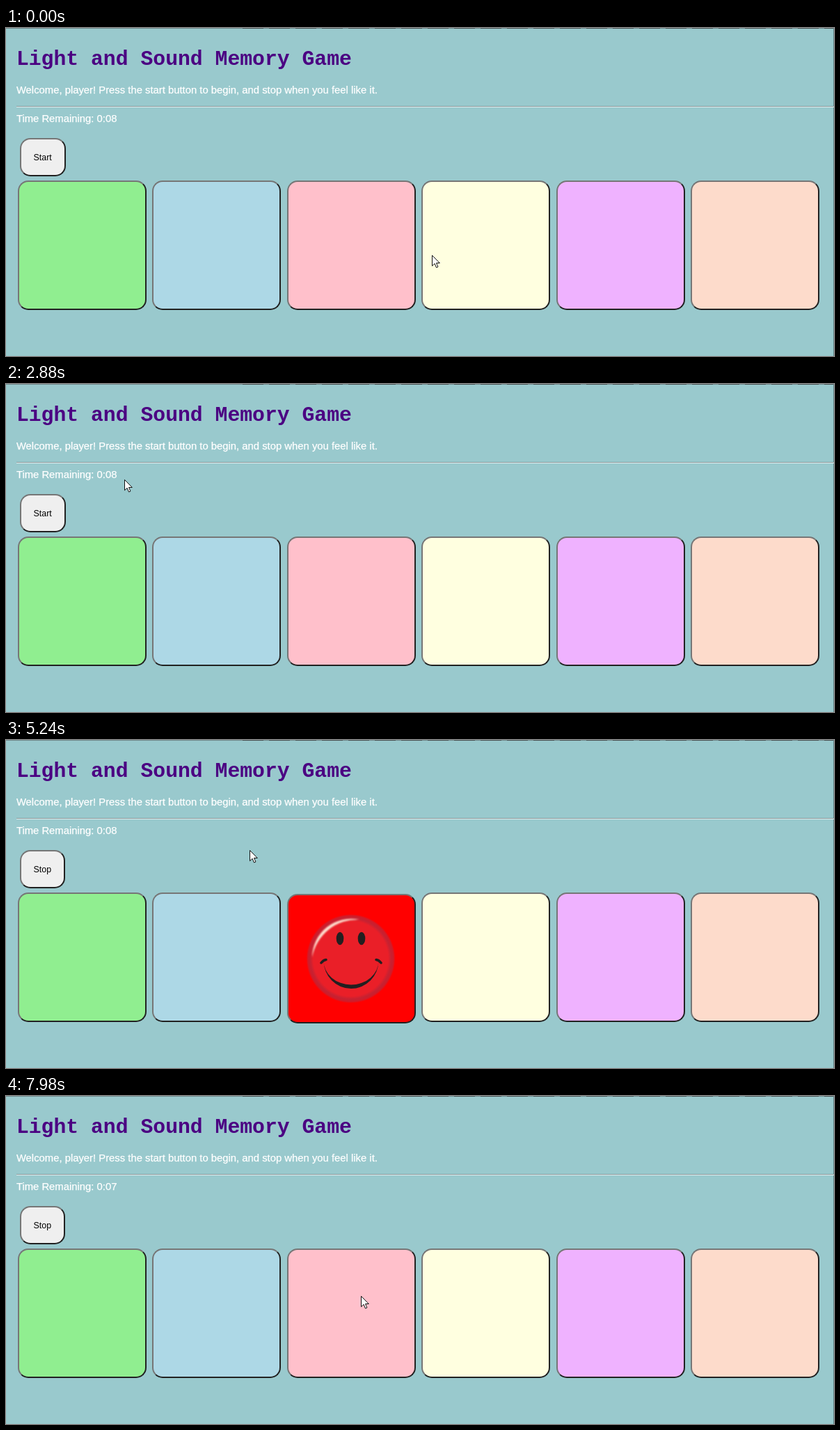
Write an HTML page that moves like this. It is 1190 px wide and 471 px high and loops after 8000 ms.

```html
<!DOCTYPE html>
<html lang="en">
<head>
<meta charset="utf-8">
<title>Memory Game</title>
<style>
html, body { margin: 0; width: 100%; height: 100%; overflow: hidden; }
body { position: relative; background: #99c9cd; }
.box {
  position: absolute; box-sizing: border-box; border: 2px solid;
  border-color: #767676 #212121 #212121 #767676; border-radius: 15px;
}
.tile { top: 219px; width: 185px; height: 186px; }
#button { left: 20px; top: 158px; height: 55px; background: #efefef; }
svg { position: absolute; left: 0; top: 0; }
text { font: 14.84px "Liberation Sans", Arial, sans-serif; fill: #fff; stroke: #fff; stroke-width: .25px; }
text.title { font: bold 29.76px "Courier New", "Liberation Mono", monospace; fill: #4b0082; stroke: none; }
text.label { font-size: 12.4px; fill: #000; stroke: none; }
</style>
</head>
<body>
<div class="box" id="button"></div>
<svg width="1190" height="471" viewBox="0 0 1190 471">
  <defs>
    <radialGradient id="rim">
      <stop offset=".84" stop-color="#ea1f28"/>
      <stop offset=".91" stop-color="#c52232"/>
      <stop offset=".96" stop-color="#cf1c2a"/>
      <stop offset="1" stop-color="#f00"/>
    </radialGradient>
    <filter id="soft"><feGaussianBlur stdDeviation=".8"/></filter>
  </defs>

  <path d="M0 .5H1190" stroke="#718a8d"/>
  <path d="M340 .5H1190" stroke="#4b5253" stroke-dasharray="30 8"/>
  <path d="M1189.5 0V471" stroke="#66868a"/>
  <path d="M15 112.5H1190" stroke="#87999b"/>
  <path d="M15 113.5H1190" stroke="#e3eeef"/>

  <text class="title" x="14.9" y="53">Light and Sound Memory Game</text>
  <text x="14.9" y="94">Welcome, player! Press the start button to begin, and stop when you feel like it.</text>
  <text id="timer" x="14.9" y="135"></text>
  <text class="label" id="label" x="39.6" y="189.5"></text>

  <g id="face">
    <circle cx="495.5" cy="314" r="64" fill="url(#rim)"/>
    <path d="M440 312A56 56 0 0 1 508 258A66 66 0 0 0 440 312Z" fill="#fde0d0" filter="url(#soft)"/>
    <g fill="#231f20">
      <ellipse cx="480" cy="285" rx="5.3" ry="9.3"/>
      <ellipse cx="511" cy="285" rx="5.3" ry="9.3"/>
      <path d="M456.500 317A39.500 40 0 0 0 535.500 317A39.500 34.500 0 0 1 456.500 317Z"/>
    </g>
    <path d="M453 320Q456 316 460 315.500M539 320Q536 316 532 315.500" fill="none" stroke="#231f20" stroke-width="3.500" stroke-linecap="round"/>
  </g>

  <path id="cursor" d="M.5 .5V15.700L4.100 12.300L6.500 18L8.900 17L6.500 11.500H11.300Z" fill="#fff" stroke="#111"/>
</svg>
<script>
const LOOP = 8000, STEP = 135;
const CLICK = 4270, LIGHT_ON = 5240, LIGHT_OFF = 6270, TICK = 7280;
const COLORS = ["#90ee90", "#add8e6", "#ffc0cb", "#ffffe0", "#efb2ff", "#fddbcb"];

// Turning points and rests of the pointer: [time, x, y].
const KEYS = [
  [470, 612, 326], [730, 478, 294], [990, 176, 203], [1380, 98, 140], [1750, 109, 103],
  [2050, 250, 52], [2330, 361, 99], [2590, 315, 131], [2880, 170, 137], [3570, 62, 183],
  [4540, 60, 184], [4790, 162, 177], [5090, 336, 160], [5240, 350, 158], [6400, 350, 158],
  [7280, 478, 162], [7680, 485, 179], [7980, 510, 287]
];

const byId = id => document.getElementById(id);
const button = byId("button"), label = byId("label"), timer = byId("timer");
const face = byId("face"), cursor = byId("cursor");

const tiles = COLORS.map((color, i) => {
  const tile = document.createElement("div");
  tile.className = "box tile";
  tile.style.left = Math.round(16.74 + 193.44 * i) + "px";
  tile.style.background = color;
  button.before(tile);
  return tile;
});

function slope(i, axis) {
  const a = KEYS[i], b = KEYS[i + 1];
  return a && b ? (b[axis] - a[axis]) / (b[0] - a[0]) : 0;
}

// Harmonic mean of the neighbouring slopes: smooth, without overshoot.
function tangent(i, axis) {
  const before = slope(i - 1, axis), after = slope(i, axis);
  return before * after > 0 ? 2 * before * after / (before + after) : 0;
}

// The pointer follows a smooth curve but is only redrawn about every STEP ms.
function pointerAt(t) {
  const i = KEYS.findLastIndex(key => key[0] <= t);
  if (i < 0) return KEYS[0].slice(1);
  const a = KEYS[i], b = KEYS[i + 1];
  if (!b) return a.slice(1);
  const span = b[0] - a[0], steps = Math.round(span / STEP);
  const u = Math.floor(steps * (t - a[0]) / span) / steps, v = 1 - u;
  return [1, 2].map(axis =>
    a[axis] * v * v * (1 + 2 * u) + b[axis] * u * u * (3 - 2 * u) +
    span * u * v * (tangent(i, axis) * v - tangent(i + 1, axis) * u));
}

function render(t) {
  const started = t >= CLICK;
  label.textContent = started ? "Stop" : "Start";
  button.style.width = started ? "65px" : "66px";
  timer.textContent = "Time Remaining: 0:0" + (t >= TICK ? 7 : 8);

  const lit = t >= LIGHT_ON && t < LIGHT_OFF;
  tiles[2].style.background = lit ? "#f00" : COLORS[2];
  tiles[2].style.top = lit ? "221px" : "219px";
  face.style.display = lit ? "" : "none";

  const [x, y] = pointerAt(t).map(Math.round);
  cursor.setAttribute("transform", `translate(${x} ${y})`);
}

const start = performance.now();
function frame() {
  render((performance.now() - start) % LOOP);
  requestAnimationFrame(frame);
}
frame();
</script>
</body>
</html>
```
